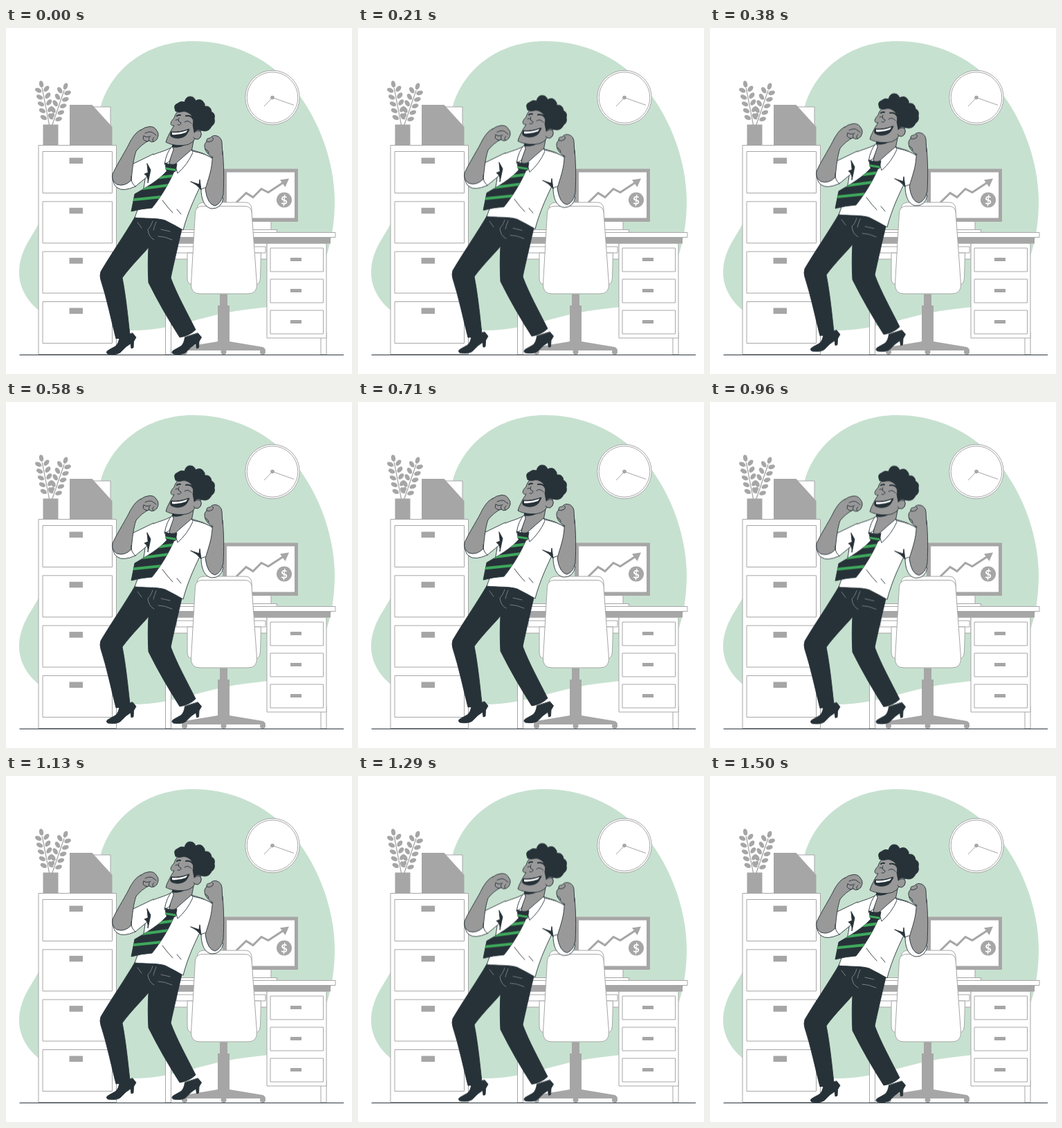
These frames come from a looping animation (500 px wide and 500 px high, 1540 ms). An HTML page without scripts:

```html
<!DOCTYPE html>
<html lang="en">
<head>
<meta charset="utf-8">
<title>Office cheer</title>
<style>
  html, body { margin: 0; width: 100%; height: 100%; overflow: hidden; background: #fff; }
  svg { display: block; width: 100%; height: 100%; }
  .room { fill: #fff; stroke: #a6a6a6; }
  .grey { fill: #a6a6a6; stroke: none; }
  .line { fill: none; stroke: #a6a6a6; }
  .man { stroke: #263238; stroke-width: .9; stroke-linejoin: round; stroke-linecap: round; animation: bounce 770ms cubic-bezier(.37, 0, .63, 1) -20ms infinite alternate; }
  .skin { fill: #999; }
  .shirt { fill: #fff; }
  .dark { fill: #263238; }
  .crease { fill: none; }
  .seam { fill: none; stroke: #8b9498; stroke-width: .8; }
  @keyframes bounce { to { transform: translateY(-8px); } }
</style>
</head>
<body>
<svg viewBox="0 0 500 500">
  <defs>
    <ellipse id="leaf" rx="5" ry="3.1"/>
    <g id="leafPair">
      <use href="#leaf" transform="translate(-6 -2) rotate(38)"/>
      <use href="#leaf" transform="translate(6 -2) rotate(-38)"/>
    </g>
    <g id="branch">
      <path class="line" d="M0 0V-54" stroke-width="1.3"/>
      <use href="#leaf" transform="translate(0 -60) rotate(90)"/>
      <use href="#leafPair" y="-50"/>
      <use href="#leafPair" y="-40"/>
      <use href="#leafPair" y="-30"/>
      <use href="#leafPair" y="-20"/>
      <use href="#leafPair" y="-10"/>
    </g>
    <g id="fileDrawer">
      <path d="M53 178.500H153.500V238.500H53Z"/>
      <path class="grey" d="M91.500 187.500H111V196H91.500Z"/>
    </g>
    <g id="deskDrawer">
      <path d="M382 318H458.500V352H382Z"/>
      <path class="grey" d="M411 332H427V337H411Z"/>
    </g>
    <path id="shoe" class="dark" d="M164 447Q163 456 158 460L149 465Q143 468 147 471Q159 473 165 469L173 461 180 456 181 463 184 462 184.500 453 188 447 183 441Z"/>
    <path id="tieShape" d="M233 206 243 207C236 224 224 244 211 260Q196 261 181 265L186 240C203 230 221 220 233 206Z"/>
    <clipPath id="tieClip"><use href="#tieShape"/></clipPath>
  </defs>

  <path fill="#c7e1d0" d="M137 113C152 60 203 19 270 19C328 19 375 43 408 78C449 122 475 190 475 250C475 300 463 347 435 380C415 402 385 402 350 406.500C300 412 260 429 215 435C170 440 105 438 60 416C35 403 19 378 19 354C19 322 37 303 47 283C70 233 123 191 137 113Z"/>

  <!-- Cabinet, plant, folder -->
  <g class="room">
    <path d="M47 169.500H159.500V471.500H47Z"/>
    <use href="#fileDrawer"/>
    <use href="#fileDrawer" y="72.300"/>
    <use href="#fileDrawer" y="144.600"/>
    <use href="#fileDrawer" y="217"/>
    <path d="M110 114H151V169H110Z"/>
  </g>
  <g class="grey">
    <path d="M92 111H124.500L153.500 143V170H92Z"/>
    <path d="M53.500 139.500H75.500V170H53.500Z"/>
    <use href="#branch" transform="translate(62.500 140) rotate(-11)"/>
    <use href="#branch" transform="translate(66.500 141) rotate(19)"/>
  </g>

  <!-- Clock -->
  <g class="room">
    <circle cx="385" cy="100.500" r="39.300"/>
    <circle cx="385" cy="100.500" r="36.800"/>
    <path d="M373 113 385 100.500 416 111.500" fill="none"/>
    <circle class="grey" cx="385" cy="100.500" r="2.800"/>
  </g>

  <!-- Monitor -->
  <g class="room">
    <path d="M345 279H383V292H345Z"/>
    <path d="M340 291.500H391.500V295.500H340ZM244 291.500H276V295.500H244Z"/>
    <path class="grey" d="M313 203.500H422V280H313Z"/>
    <path stroke="none" d="M319 208.500H417V274.500H319Z"/>
    <path class="line" stroke-width="3" d="M333 252 347 238.500 357 244.500 369 232.500 379 237.500 402 222.500"/>
    <path class="grey" d="M396 219.500 409 217.500 403.500 230Z"/>
    <circle class="grey" cx="402" cy="248.500" r="11"/>
    <text x="402" y="254.500" text-anchor="middle" font-family="Lato, sans-serif" font-weight="700" font-size="17" fill="#fff" stroke="none">$</text>
  </g>

  <!-- Desk -->
  <g class="room">
    <path d="M230.500 303H238.500V472H230.500ZM455 440H463V472H455Z"/>
    <path d="M238.500 311H377V334H238.500Z"/>
    <path d="M246 316H375V325H246Z"/>
    <path d="M377 311H463V448H377Z"/>
    <use href="#deskDrawer"/>
    <use href="#deskDrawer" y="45"/>
    <use href="#deskDrawer" y="90"/>
    <path class="grey" d="M232 303H469V311.500H232Z"/>
    <path d="M226 295.500H476V302.500H226Z"/>
  </g>

  <!-- Chair -->
  <g class="room">
    <path d="M271 325H262V362Q262 371 271 371H360Q367 371 367.500 361L368.500 325Z"/>
    <path d="M276 270V261Q277 252 286 252H346Q354 252 355 261L356 290Z"/>
    <path d="M283 257.500H346Q354 258 355 266L362.500 370Q363 384 350 384H280Q267 384 267.500 370L273.500 266Q275 258 283 257.500Z"/>
    <g class="grey">
      <path d="M309 384.500H320V401H323V453L371 461Q375 463 375 466H254Q254 463 258 461L306 453V401H309Z"/>
      <circle cx="258" cy="468" r="4"/>
      <circle cx="314.500" cy="468" r="4"/>
      <circle cx="371" cy="468" r="4"/>
    </g>
  </g>
  <path d="M19.500 472.400H488" stroke="#263238"/>

  <g class="man">
    <use href="#shoe"/>
    <use href="#shoe" x="94.500"/>
    <path class="dark" d="M187 272C172 298 151 328 137 352Q135 358 137 364C146 392 152 422 159 449Q170 449 179 443C176 416 173 386 168 361C182 342 197 328 206 317C205 335 205 350 206 368C220 396 235 422 251 447Q265 445 274 436C261 410 247 385 238 361C243 338 249 312 254 291L250 280 230 270Z"/>
    <path class="seam" d="M190 281 196 289M212 279Q209 288 205 291Q206 302 214 306M217 280Q214 287 213 292M220 301Q229 301 240 306M224 291 237 294"/>

    <!-- Torso -->
    <path class="shirt" d="M240 172C229 179 216 180 208 186L201 218C199 238 192 258 186 274C200 276 218 274 230 278Q244 285 256 292C263 265 274 243 283 224L299 188Q285 180 268 176Z"/>
    <path class="crease" d="M226 249Q234 260 241 267M247 262 253 269"/>
    <path class="skin" d="M243 160 240 175 236 196 245 202 268 179 272 158Z"/>
    <path class="dark" d="M240 164 241 172Q255 174 266 163Z"/>

    <!-- Collar and tie -->
    <path class="shirt" d="M240 171Q232 179 229 197L236 193 242 176ZM268 176Q256 186 244 197L248 210Q262 198 270 180Z"/>
    <use href="#tieShape" class="dark"/>
    <path clip-path="url(#tieClip)" stroke="#3fa85c" stroke-width="4" stroke-linecap="butt" d="M175 249 225 244M190 233 236 227M206 218 246 213"/>
    <path class="dark" d="M230 195Q239 199 247 196L245 207 239 209 232 206Z"/>
    <path stroke="#3fa85c" stroke-width="3" d="M231.500 203 244 205"/>

    <!-- Raised arm, left side -->
    <path class="shirt" d="M213 182 182 197 179 215 154 213Q154 227 161 231Q169 237 187 229L204 215"/>
    <path class="skin" d="M195 147C187 151 184 157 180 163C174 176 162 194 154 211Q152 221 160 226Q171 230 181 220C183 201 184 190 188 178Q196 168 206 163"/>
    <path class="crease" d="M187 229Q180 224 181 214"/>
    <path class="dark" d="M204 196 209 205 205 224Q206 214 200 211L205 209Z"/>
    <path class="skin" d="M194 148Q200 143 207 142.500Q214 142 217 147Q221 151 220 156Q219 162 214 164Q210 166 207 163Q201 165 198 160L199 156"/>
    <path class="crease" d="M201 152Q209 148 213 152L217 155M207 163Q205 159 209 156M213 164Q210 161 214 158M199 156Q203 159 207 157"/>

    <!-- Raised arm, right side -->
    <path class="shirt" stroke="none" d="M270 178Q292 182 299 189L291 236 282 235 277 210Z"/>
    <path class="crease" d="M270 178Q290 182 299 189"/>
    <path class="shirt" d="M282 233C282 246 286 260 298 261Q311 261 314 246L288 231Z"/>
    <path class="skin" d="M298 184C299 202 292 219 288 233Q291 255 302 257Q311 254 314 240C315 217 315 198 313 178"/>
    <path class="dark" d="M267 222 279 226 280 219 282 234Q276 226 267 222Z"/>
    <path class="skin" d="M299 187Q291 183 288 176Q285 168 290 164Q289 159 295 159Q299 154 305 156Q311 158 312 165L313 183"/>
    <path class="crease" d="M290 164Q293 166 298 163Q301 160 298 158M288 175Q292 176 293 181"/>

    <!-- Head -->
    <path class="skin" d="M250 118Q244 125 243 130C236 137 237 142 243 141Q238 148 236 153Q232 160 231 165C240 170 255 171 264 168Q271 165 273 160Q281 162 282 154L276 122Z"/>
    <path class="dark" stroke-width=".8" d="M245 120Q241 111 248 109Q252 105 258 107Q260 99 266 99Q272 99 274 105Q282 101 286 108Q288 110 287 113Q296 112 297 121Q303 124 301 131Q303 138 297 142Q294 149 287 149L281 148Q276 145 272 151L270 140Q272 131 267 125Q260 119 254 121Q249 123 245 120Z"/>
    <path class="skin" d="M272 151Q278 146 282 151Q283 158 277 161Q272 161 271 158"/>
    <path class="dark" d="M239 150Q252 151 264 146Q263 155 255 158Q246 161 239 157Q236 154 239 150Z"/>
    <path class="shirt" stroke="none" d="M240 151Q252 152 262.500 147.500L260 151Q250 155 240 154Z"/>
    <path class="crease" d="M250 130Q247 135 253 137Q253 141 248 140M258 136Q263 132 268 138M245 133Q248 131 250 134M265 146Q265 149 263 150"/>
    <path class="crease" stroke-width="2" d="M247 127Q249 125 252 126M260 127Q267 126 270 131"/>
  </g>
</svg>
</body>
</html>
```
